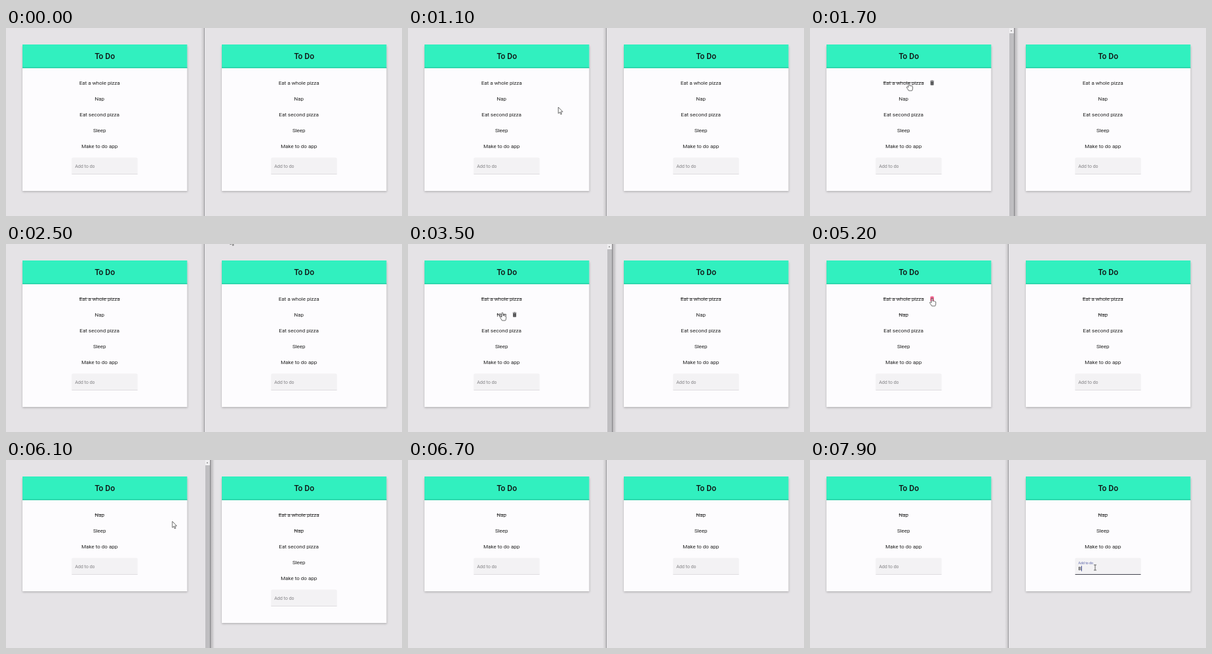
These frames come from a looping animation (600 by 285 pixels, 8 s). An HTML page:

```html
<!DOCTYPE html>
<html lang="en">
<head>
<meta charset="utf-8">
<title>To Do</title>
<style>
  html, body { margin: 0; width: 100%; height: 100%; overflow: hidden; background: #e5e3e6; }
  body { position: relative; }
  /* Cards are laid out at double size and shown at half */
  .card { position: absolute; left: 25.3px; top: 24.6px; width: 499px; padding-bottom: 50px;
    transform: scale(.5); transform-origin: 0 0; font: 16px/48px Roboto, sans-serif; color: #222;
    background: #fdfcfe; box-shadow: 0 3px 6px rgba(0, 0, 0, .22); }
  .card.right { left: 326.9px; top: 25.1px; }
  h1 { margin: 0; font: 500 24px/72px Roboto, sans-serif; text-align: center; color: #111;
    background: #31f0bf; box-shadow: inset 0 -4px 3px -1px rgba(0, 0, 0, .14); }
  ul { margin: 0; padding: 20px 32px 11px 0; list-style: none; text-align: center; }
  li { height: 48px; }
  li span { position: relative; display: inline-block; }
  b { font-weight: 400; }
  .done b { text-decoration: line-through; }
  .gone { display: none; }
  .bin { position: absolute; left: 100%; top: 14px; margin-left: 15px; width: 20px; height: 20px;
    fill: #5c5c5e; visibility: hidden; }
  .field { position: relative; left: 149px; box-sizing: border-box; width: 200px; height: 51px;
    background: #f3f2f4; border-bottom: 1.5px solid #98979a; border-radius: 4px 4px 0 0; }
  .field * { position: absolute; left: 10px; white-space: pre; transform-origin: 0 50%; }
  .field label { top: 14px; font-size: 14px; line-height: 24px; color: #858487; }
  .field i { top: 24px; font: 14px/16px Roboto, sans-serif; border-right: 2px solid #3f4a8f; visibility: hidden; }
  .focus { border-bottom: 2px solid #444450; }
  .focus label { color: #5a63a8; }
  .focus i { visibility: visible; }
  .edge, .bar { position: absolute; top: 0; height: 100%; }
  .edge.r { left: 295px; width: 4.5px; border-right: 1px solid #9b9a9d;
    background: linear-gradient(90deg, transparent, rgba(0, 0, 0, .12)); }
  .edge.l { left: 309px; width: 6px; border-left: 1px solid #858487;
    background: linear-gradient(270deg, transparent, rgba(0, 0, 0, .22)); }
  .bar { left: 302px; width: 7px; background: linear-gradient(#efeef0 8px, #bfbec1 8px); }
  .bar::after { content: ""; position: absolute; left: 2px; top: 3px;
    border: 1.5px solid transparent; border-top: 0; border-bottom: 2px solid #666; }
  #stage { position: absolute; left: 0; top: 0; width: 600px; height: 285px; overflow: hidden; }
  #cursor { fill: #fff; stroke: #444; stroke-width: .8; stroke-linejoin: round; }
</style>
</head>
<body>
<script>
// Times are for the left card, then the right one
const items = [
  { text: 'Eat a whole pizza', done: [1700, 2700], gone: [5400, 6700] },
  { text: 'Nap', done: [3500, 4500] },
  { text: 'Eat second pizza', gone: [6100, 6700] },
  { text: 'Sleep' },
  { text: 'Make to do app' }
];

// Places where the pointer rests: arrive, leave, x, y, hovered row
const stops = [
  [900, 900, 255, 133],
  [1500, 1900, 150, 83, 0],
  [2600, 2800, 351, -14],
  [3400, 3500, 143, 104, 1],
  [4300, 4600, 351, -14],
  [5100, 5400, 185, 82, 0],
  [5700, 6000, 185, 105, 2],
  [6100, 6100, 252, 93],
  [6500, 6700, 351, -14],
  [7400, 8000, 432, 163]
];

// Each click moves the other window to the front
const switches = [1700, 2500, 3500, 4300, 5400, 6500];

const shapes = {
  arrow: 'M0 0V9.5L2.2 7.5 3.7 11 5.2 10.3 3.7 7H6.7Z',
  hand: 'M-1 7V1a1 1 0 0 1 2 0V4.5q1-.6 1.7.3 1-.5 1.6.5 1.2-.3 1.3.8V8.5q0 1.8-1 3.5H-.5Q-2 9.5-3.5 7.3-3.8 6.2-2.8 6-2 6.2-1 7Z',
  beam: 'M-2-4H2M0-4V4M-2 4H2'
};

const bin = `<svg class="bin" viewBox="0 0 24 24"><path d="M6 19c0 1.1.9 2 2 2h8c1.1 0 2-.9 2-2V7H6zM19 4h-3.5l-1-1h-5l-1 1H5v2h14z"/></svg>`;
const card = side => `<div class="card ${side}"><h1>To Do</h1>
  <ul>${items.map(item => `<li><span><b>${item.text}</b>${bin}</span></li>`).join('')}</ul>
  <div class="field"><label>Add to do</label><i></i></div></div>`;
document.body.innerHTML = `${card('left')}${card('right')}
  <div id="frontR" class="edge r"></div>
  <div id="frontL"><div class="bar"></div><div class="edge l"></div></div>
  <svg id="stage"><path id="cursor"/></svg>`;

const $ = s => document.querySelector(s);
const lists = ['left', 'right'].map(side => [...document.querySelectorAll(`.${side} li`)]);
const field = $('.right .field'), label = $('.right label'), value = $('.right i');
const cursor = $('#cursor');

function pointer(t) {
  const k = stops.findIndex(s => s[1] > t);
  if (k < 1) return [-50, -50];
  const [, t0, x0, y0] = stops[k - 1], [t1, , x1, y1] = stops[k];
  const u = Math.min(1, (t - t0) / (t1 - t0));
  const ease = u * u * (3 - 2 * u);
  return [x0 + (x1 - x0) * ease, y0 + (y1 - y0) * ease];
}

function draw(t) {
  const [x, y] = pointer(t);
  const hover = stops.find(s => s.length > 4 && t > s[0] - 200 && t < s[1] + 100);

  lists.forEach((list, side) => list.forEach((li, i) => {
    for (const state of ['done', 'gone'])
      li.classList.toggle(state, t >= items[i][state]?.[side]);
    const icon = li.querySelector('.bin');
    icon.style.visibility = side === 0 && hover?.[4] === i ? 'visible' : 'hidden';
    icon.style.fill = hover?.[2] === 185 ? '#ee2f68' : '';
  }));

  const leftFront = switches.filter(s => t >= s).length % 2 === 1;
  $('#frontL').hidden = !leftFront;
  $('#frontR').hidden = leftFront;

  const lift = Math.min(1, Math.max(0, (t - 7400) / 150));
  field.classList.toggle('focus', lift > 0);
  label.style.transform = `translateY(${-11 * lift}px) scale(${1 - .25 * lift})`;
  value.textContent = t >= 7900 ? 'B' : '';

  cursor.setAttribute('d', shapes[hover ? 'hand' : t >= 7200 ? 'beam' : 'arrow']);
  cursor.setAttribute('transform', `translate(${x} ${y})`);
}

const start = performance.now();
function tick() {
  const t = (performance.now() - start) % 8000;
  draw(Math.floor(t / 100) * 100);
  requestAnimationFrame(tick);
}
tick();
</script>
</body>
</html>
```
